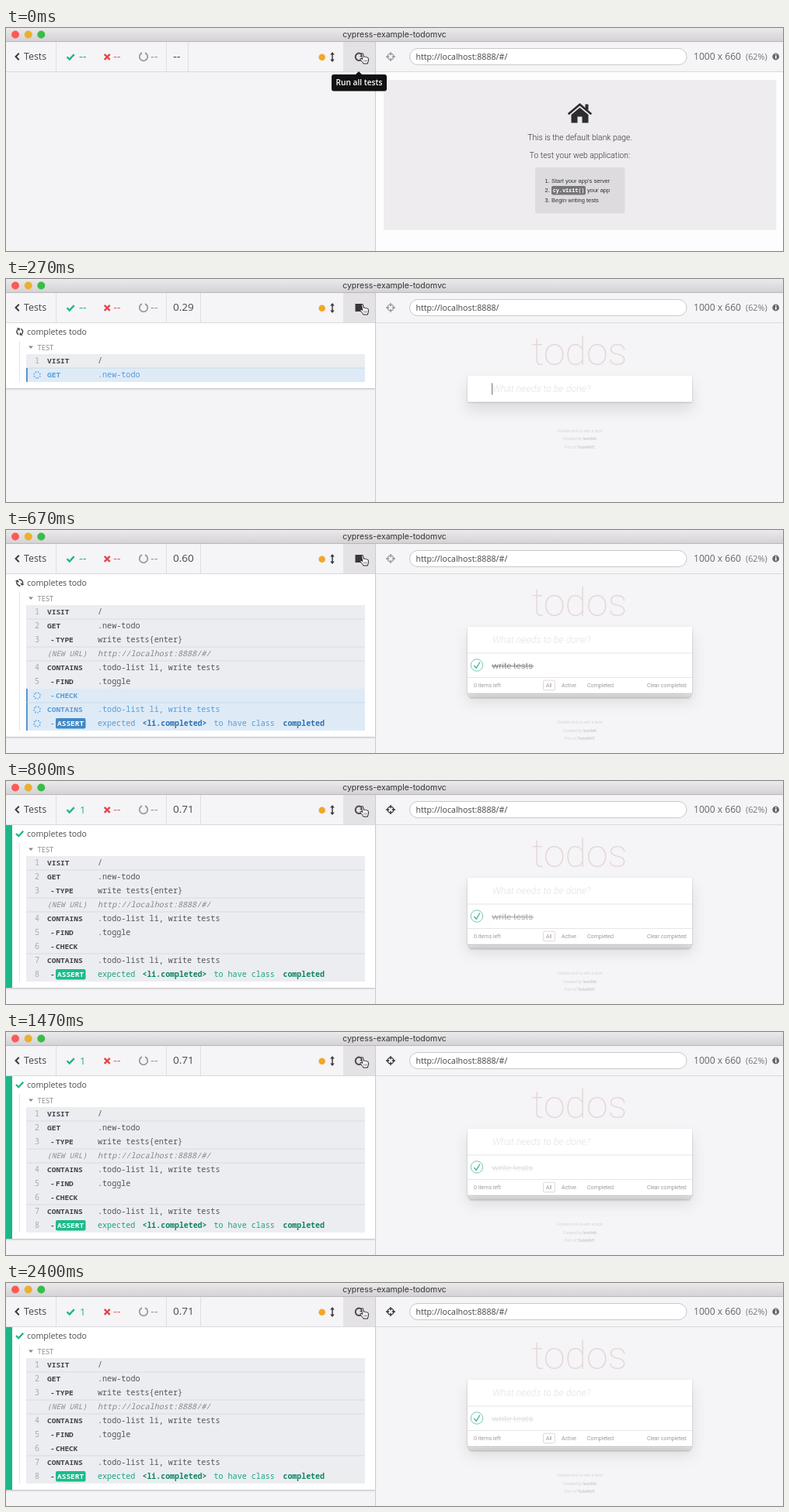
Write an HTML page that moves like this. It is 1000x288 px and loops after 2.47 s.

```html
<!DOCTYPE html>
<html lang="en">
<head>
<meta charset="utf-8">
<title>Test runner</title>
<style>
html, body { margin: 0; height: 100%; overflow: hidden; background: #f4f3f6; }
svg { display: block; width: 100vw; height: 100vh; }
text { white-space: pre; }
.ui { font-family: "Open Sans", "Noto Sans", sans-serif; }
.title { font-family: Inter, "Open Sans", sans-serif; }
.mono { font-family: "Noto Sans Mono", "DejaVu Sans Mono", monospace; }
.thin { font-family: Roboto, Inter, sans-serif; font-weight: 300; }
.arial { font-family: "Liberation Sans", Arial, sans-serif; }
</style>
</head>
<body>
<svg id="stage" viewBox="0 0 1000 288" preserveAspectRatio="none"></svg>
<script>
const LOOP = 2470, STEPS = 37, DONE = 800;
const BLUE = '#5a9bd5', GREEN = '#1bb588', DARK = '#3a3a3f';
const stage = document.getElementById('stage');

const esc = s => s.replace(/&/g, '&amp;').replace(/</g, '&lt;');
const text = (cls, size, x, y, fill, s, more = '') =>
  `<text class="${cls}" font-size="${size}" x="${x}" y="${y}" fill="${fill}" ${more}>${esc(s)}</text>`;
const rect = (x, y, w, h, fill, more = '') =>
  `<rect x="${x}" y="${y}" width="${w}" height="${h}" fill="${fill}" ${more}/>`;
const circle = (x, y, r, fill, more = '') =>
  `<circle cx="${x}" cy="${y}" r="${r}" fill="${fill}" ${more}/>`;
const line = (d, stroke, width = 1, more = '') =>
  `<path d="${d}" fill="none" stroke="${stroke}" stroke-width="${width}" ${more}/>`;
const shape = (d, fill, more = '') => `<path d="${d}" fill="${fill}" ${more}/>`;
const at = (x, y, turn, body) => `<g transform="translate(${x} ${y}) rotate(${turn})">${body}</g>`;
const clamp = v => Math.max(0, Math.min(1, v));

// number, command, message, start, end, line above
const rows = [
  ['1', 'VISIT', '/', 200, 270, 0],
  ['2', 'GET', '.new-todo', 270, 330, 1],
  ['3', '-TYPE', 'write tests{enter}', 330, 600, 0],
  ['', '(NEW URL)', 'http://localhost:8888/#/', 400, 400, 1],
  ['4', 'CONTAINS', '.todo-list li, write tests', 600, 600, 1],
  ['5', '-FIND', '.toggle', 600, 600, 0],
  ['6', '-CHECK', '', 600, DONE, 0],
  ['7', 'CONTAINS', '.todo-list li, write tests', 670, DONE, 1],
  ['8', '-ASSERT', '', 670, DONE, 0]
];

const defs = `<defs>
  <linearGradient id="bar" x2="0" y2="1"><stop stop-color="#ebe9eb"/><stop offset="1" stop-color="#d3d1d3"/></linearGradient>
  <filter id="soft" x="-20%" y="-20%" width="140%" height="180%"><feDropShadow dx="0" dy="1" stdDeviation="1.3" flood-opacity=".25"/></filter>
  <filter id="deep" x="-20%" y="-30%" width="140%" height="220%">
    <feDropShadow dx="0" dy="1" stdDeviation="1" flood-opacity=".22"/>
    <feDropShadow dx="0" dy="11" stdDeviation="9" flood-opacity=".1"/></filter>
</defs>`;

const tick = (x, y) => line(`M${x - 4.5} ${y}l3.2 3.2l6 -6.4`, GREEN, 2.3);

function titleBar() {
  return rect(0, 0, 1000, 18, 'url(#bar)') + rect(0, 17, 1000, 1, '#b9b7b9') +
    circle(12, 8.5, 5, '#fc5b57') + circle(28.7, 8.5, 5, '#e9b02f') + circle(45.3, 8.5, 5, '#39bd48') +
    text('title', 10.5, 500, 12.3, '#333', 'cypress-example-todomvc', 'text-anchor="middle"');
}

function header(t) {
  const idle = t < 70, done = t >= DONE, running = !idle && !done;
  const ui = (size, x, y, fill, s, more) => text('ui', size, x, y, fill, s, more);
  const seconds = (Math.floor(29.85 + .0777 * (Math.min(t, DONE + 1) - 270)) / 100).toFixed(2);
  const timed = t >= 200;
  const icon = done || idle
    ? line('M457.8 40.6A4.7 4.7 0 1 1 458.4 34.8', '#4b4a4d', 2) + shape('M460 32v5h-5z', '#4b4a4d')
    : rect(449.5, 32, 10, 10, '#38373a');
  const url = 'http://localhost:8888/' + (t >= 200 && t < 400 ? '' : '#/');
  const aim = done ? '#333' : '#99979b';
  return rect(0, 18, 1000, 38, '#f5f4f7') + rect(434, 18, 41, 38, '#e4e2e5') +
    rect(0, 56, 1000, 1, '#d9d8db') +
    [64, 206, timed ? 250 : 234].map(x => rect(x, 18, 1, 38, '#dfdee1')).join('') +
    line('M16.7 32.8l-4.2 4.2l4.2 4.2', DARK, 2) + ui(12.4, 23, 41, '#444348', 'Tests') +
    tick(83, 37.3) + (done ? ui(13, 95, 41.6, GREEN, '1') : ui(15, 94, 41.6, GREEN, '--')) +
    line('M126.7 33.8l7 7m0 -7l-7 7', '#e5484a', 2.5) + ui(15, 138, 41.6, '#e5605f', '--') +
    line('M179 32.1A5.3 5.3 0 1 1 175 32.1', '#99989b', 1.8) + ui(15, 186, 41.6, '#99989b', '--') +
    (timed ? ui(13.5, 215, 41.4, '#48474b', seconds) : ui(15, 215, 41.6, '#48474b', '--')) +
    circle(406.7, 37.7, 4.3, '#f3a726') +
    line('M420 33.5v8', DARK, 1.5) + shape('M420 31l2.8 3.6h-5.6zM420 44l2.8 -3.6h-5.6z', DARK) +
    icon +
    circle(495, 37, 3.9, 'none', `stroke="${aim}" stroke-width="1.4"`) +
    line('M495 31v4.2m0 3.6v4.2M489 37h4.2m3.6 0h4.2', aim, 1.4) +
    rect(519.5, 26.5, 356.5, 21, '#fff', 'rx="10.5" stroke="#c9c8cb"') +
    ui(10.67, 527.5, 40.7, '#444', url) +
    ui(12.1, 885, 41, '#66656a', '1000 x 660') + ui(10.8, 952, 40.7, '#77767b', '(62%)') +
    circle(990.7, 37, 4.4, '#68676b') + rect(990, 36, 1.6, 3.6, '#fff') + rect(990, 33.8, 1.6, 1.4, '#fff');
}

function spinner(x, y, t) {
  return at(x, y, t * .36, circle(0, 0, 4, 'none', `stroke="${BLUE}" stroke-width="1.6" stroke-dasharray="1.4 1.74"`));
}

function assertion(y, running) {
  const base = running ? BLUE : '#17a67c', strong = running ? '#2e70b0' : '#0d8561';
  return [[118, 'expected'], [175.5, '<li.completed>', 1], [267.5, 'to have class'], [356.5, 'completed', 1]]
    .map(([x, s, b]) => text('mono', b ? 9.9 : 10.05, x, y, b ? strong : base, s, b ? 'font-weight="700"' : '')).join('');
}

function command([num, name, message, start, end, ruled], i, t) {
  const y = 97 + 18 * i, base = y + 11.7, running = t < end;
  const child = name[0] == '-', label = child ? name.slice(1) : name;
  const info = !num, assert = label == 'ASSERT';
  const color = running ? BLUE : info ? '#8b8a90' : '#404046';
  const slant = info ? 'font-style="italic"' : '';
  let out = rect(26, y, 436, 18, running ? '#deebf7' : '#ecedf1');
  if (ruled) out += rect(26, y - .5, 436, 1, running ? '#c9dbea' : '#dadbdf');
  if (running) out += rect(26, y, 1.7, 18, '#4485c0') + spinner(40, y + 9, t);
  else out += text('mono', 10, 43, base, '#a9a9ae', num, 'text-anchor="end"');
  if (child) out += text('mono', 9.5, 57, base, color, '-', 'font-weight="600"');
  if (assert) out += rect(64, y + 2, 38.5, 13.5, running ? '#4088c9' : '#1bbc8c', 'rx="2"');
  out += text('mono', 9.5, child ? assert ? 66 : 64 : 53, base, assert ? '#fff' : color, label,
    slant || 'font-weight="600"');
  return out + (assert ? assertion(base, running)
    : text('mono', 10.1, 118, base, running ? BLUE : info ? '#85848a' : '#54545a', message, slant));
}

function testPanel(t) {
  let out = rect(0, 57, 475, 231, '#f4f3f6');
  if (t >= 70) {
    const shown = rows.filter(r => t >= r[3]);
    const end = 97 + 18 * shown.length, bottom = shown.length ? end + 8 : 79;
    out += rect(-4, 57, 479, bottom - 57, '#fff', 'filter="url(#soft)"');
    if (t >= DONE) out += rect(0, 57, 8, bottom - 57, '#1bb787') + tick(17.5, 68);
    else out += at(17.7, 68, t * .36,
      line('M-3.8 -1A4 4 0 0 1 3 -2.6M3.8 1A4 4 0 0 1 -3 2.6', DARK, 1.4) +
      shape('M4.6 -4.4v4h-4zM-4.6 4.4v-4h4z', DARK));
    out += text('ui', 10.6, 27, 71.5, '#4c4b50', 'completes todo');
    if (shown.length) out += rect(17, 80, 1, end - 80, '#e6e5e8') +
      shape('M29 86.5h6l-3 3.6z', '#88878c') + text('ui', 9.4, 40.5, 91.6, '#838288', 'TEST') +
      shown.map((r, i) => command(r, i, t)).join('');
  }
  return out;
}

function blankPage() {
  const thin = (y, s) => text('thin', 10.35, 738.5, y, '#333', s, 'text-anchor="middle"');
  const item = (n, y, s, x = 702) =>
    text('arial', 7.5, 693.5, y, '#333', n + '.') + text('arial', 7.5, x, y, '#333', s);
  return rect(476, 57, 524, 231, '#fefdfe') + rect(486, 67, 505.5, 194, '#eeecef', 'rx="3"') +
    shape('M727.5 112l11 -9.2l11 9.2v10.5h-8v-8h-6v8h-8z', '#2d2c2e') +
    line('M723.7 111.2L738.5 98.7L753.3 111.2', '#2d2c2e', 2.7) + rect(745.5, 98.5, 4, 7, '#2d2c2e') +
    thin(144.5, 'This is the default blank page.') + thin(167.5, 'To test your web application:') +
    rect(681, 180, 115.5, 59.5, '#dddbde', 'rx="4"') +
    item(1, 199.5, "Start your app's server") +
    item(2, 212.3, 'your app', 748) + rect(702, 204, 44, 11.5, '#757477', 'rx="2"') +
    text('mono', 6.8, 703.7, 212.2, '#fff', 'cy.visit()', 'font-weight="700"') +
    item(3, 225, 'Begin writing tests');
}

function todoItem(t) {
  const checked = t >= 670;
  const v = Math.round(95 + 122 * clamp((t - 640) / 400)), ink = checked ? `rgb(${v},${v},${v})` : '#5f5f5f';
  const foot = (x, s) => text('thin', 7.1, x, 203.4, '#6f6e70', s);
  return line('M594 159h289M594 190.5h289', '#e7e5e7') +
    circle(606, 174.5, 7.7, 'none', `stroke="${checked ? '#76c5b5' : '#e9e7e9'}"`) +
    (checked ? line('M602.3 175l3 3.3l4.6 -7.8', '#3fb59d', 1.3) + line('M625 175.8h54', ink, .9) : '') +
    text('thin', 11.5, 625.5, 179, ink, 'write tests') +
    foot(602, checked ? '0 items left' : '1 item left') + foot(695, 'All') + foot(715, 'Active') +
    foot(748, 'Completed') + (checked ? foot(825, 'Clear completed') : '') +
    rect(691.5, 194.2, 15, 12.6, 'none', 'rx="1.5" stroke="#dfcccd" stroke-width=".8"');
}

function todoPage(t) {
  let out = rect(476, 57, 524, 231, '#f5f4f6');
  if (t < 270) return out;
  const added = t >= 530;
  const typed = t < 330 || added ? '' : 'write tests'.slice(0, Math.round((t - 290) / 16));
  const credit = (y, s, bold = '') =>
    `<text class="thin" font-size="5.2" x="738.5" y="${y}" fill="#c9c7c9" text-anchor="middle">${s}<tspan font-weight="500">${bold}</tspan></text>`;
  out += text('thin', 50, 738, 110.8, '#e5d3d4', 'todos', 'text-anchor="middle" style="font-weight:100"');
  if (added) out += rect(597, 205, 283, 11, '#f8f7f8', 'filter="url(#soft)"') +
    rect(595.5, 205, 286, 8.5, '#f8f7f8', 'filter="url(#soft)"');
  out += rect(594, 125, 289, added ? 85.5 : 33.5, '#fff', 'filter="url(#deep)"');
  out += typed ? text('thin', 11.5, 625.5, 146, '#5f5f5f', typed)
    : text('thin', 12.4, 626, 146, '#e4e2e4', 'What needs to be done?', 'font-style="italic"');
  if (t < 600) out += rect(625.3 + 4.8 * typed.length, 134.5, .9, 15, '#555');
  if (added) out += todoItem(t);
  const y = added ? 250 : 197.5;
  return out + credit(y, 'Double-click to edit a todo') + credit(y + 10.5, 'Created by ', 'lanofelt') +
    credit(y + 21, 'Part of ', 'TodoMVC');
}

function tooltip() {
  return shape('M449 61l5 -5l5 5z', '#111') + rect(419, 60, 71, 21.5, '#111', 'rx="3"') +
    text('ui', 10.2, 454.5, 74.3, '#fff', 'Run all tests', 'text-anchor="middle" font-weight="600"');
}

const hand = shape('M457.4 33.2q1.4 -1.2 2.2 .6l.8 3.6q1 -.8 2 .2q1.2 -.7 2 .4q1.6 -.3 1.9 1.2l.2 3q-.2 1.8 -1 2.8v1h-5.6l-.7 -1.4q-1.6 -1.5 -3.2 -4q-.3 -1.6 1.2 -1.3l1.5 1.2z',
  '#fff', 'stroke="#222" stroke-width="1" stroke-linejoin="round"') +
  line('M460.8 41v2.8m1.8 -2.8v2.8m1.8 -2.8v2.8', '#444', .6);

function draw(t) {
  stage.innerHTML = defs + (t < 130 ? blankPage() : todoPage(t)) + testPanel(t) +
    header(t) + rect(475, 18, 1, 270, '#cbcacd') + titleBar() + (t < 70 ? tooltip() : '') + hand;
}

let last = -1;
function frame(now) {
  const step = Math.floor((now % LOOP + 5) / (LOOP / STEPS)) % STEPS;
  if (step != last) draw(Math.round(step * 20 / 3) * 10);
  last = step;
  requestAnimationFrame(frame);
}
draw(0);
requestAnimationFrame(frame);
</script>
</body>
</html>
```
